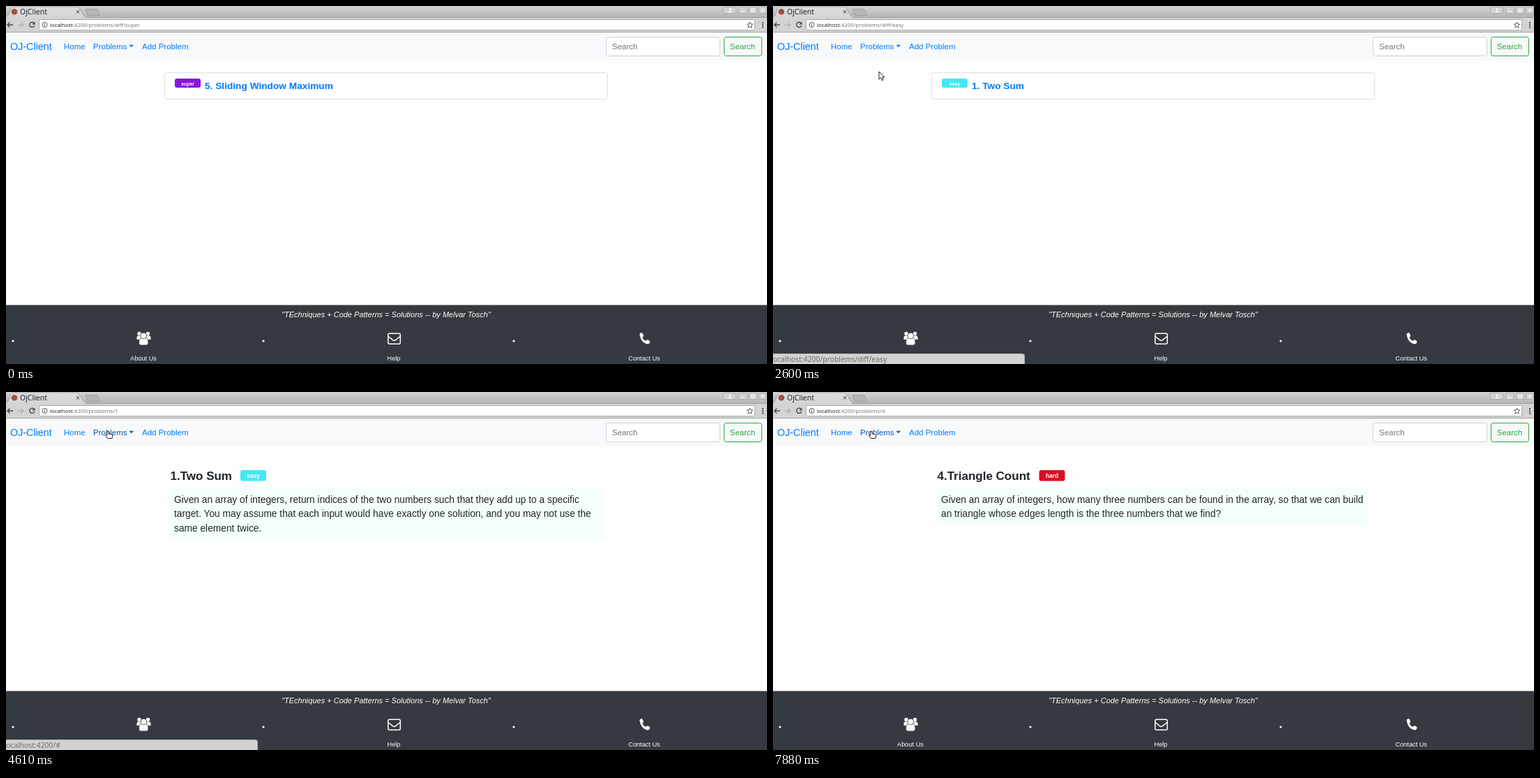
Recreate the animation shown at these times as an HTML page. Size 1091 by 513 pixels, loop 8000 ms.

```html
<!DOCTYPE html>
<html lang="en">
<head>
<meta charset="utf-8">
<title>OjClient</title>
<style>
html, body { margin: 0; width: 100%; height: 100%; overflow: hidden; background: #fefefe; }
svg { display: block; width: 1091px; height: 513px; font: 11.5px "Liberation Sans", Arial, sans-serif; fill: #212529; }
text { white-space: pre; }
.ui { font-family: "Noto Sans", "Open Sans", sans-serif; }
.link { fill: #007bff; }
.link.hover { fill: #0056b3; }
.bold { font-weight: bold; }
.mid { text-anchor: middle; }
.white { fill: #fff; }
.line { fill: none; stroke: #444; stroke-width: 1.3; }
.win { fill: #d2d2d2; stroke: #a8a8a8; stroke-width: .8; }
.cursor { fill: #fff; stroke: #222; stroke-width: 1; stroke-linejoin: round; }
</style>
</head>
<body>
<svg viewBox="0 0 1091 513">
  <defs>
    <linearGradient id="strip" x2="0" y2="1"><stop stop-color="#d2d2d2"/><stop offset="1" stop-color="#b2b2b2"/></linearGradient>
    <linearGradient id="bar" x2="0" y2="1"><stop stop-color="#dedede"/><stop offset="1" stop-color="#d3d3d3"/></linearGradient>
  </defs>

  <!-- browser frame -->
  <g class="ui">
    <path fill="url(#strip)" d="M0 0H1091V18H0z"/>
    <path fill="#d3d3d3" d="M0 17H1091V38H0z"/>
    <path stroke="#999" d="M0 16.5H1091M0 37.5H1091" stroke-width=".8"/>
    <path fill="url(#bar)" d="M0 18V16Q3 15 5 8T10 1H102Q105 1 107 6T115 17V18z"/>
    <path class="line" style="stroke:#999;stroke-width:.8" d="M0 16Q3 15 5 8T10 1H102Q105 1 107 6T115 17"/>
    <path fill="#b5b5b5" stroke="#999" stroke-width=".8" d="M114 4.5H130Q132 4.5 134.500 13.500H119Q117 13.500 114 4.500z"/>
    <circle cx="12" cy="8.300" r="4.300" fill="#a5513c"/>
    <text x="20" y="12" font-size="10.450">OjClient</text>
    <path class="line" style="stroke-width:1" d="M101 6l4 4.500m0-4.500l-4 4.500"/>
    <path class="win" d="M1028.500 1.500h18v9h-18zM1050.500 1.500h12v9h-12zM1065.500 1.500h11v9h-11zM1079.500 1.500h11v9h-11z"/>
    <path fill="none" stroke="#fff" d="M1036 8.500q2-3 4 0zM1054 8h5M1069 4h4v4h-4zM1083 4l4 4m0-4l-4 4"/>
    <circle cx="1038" cy="4.500" r="1.300" fill="#fff"/>
    <path class="line" d="M10 27H2M5.500 23.500L2 27l3.500 3.500"/>
    <path class="line" style="stroke:#b2b2b2" d="M17 27h8M21.500 23.500L25 27l-3.500 3.500"/>
    <path class="line" d="M40.500 25a3.600 3.600 0 1 0 .3 3"/>
    <path fill="#444" d="M41.500 22.500v4h-4z"/>
    <rect x="47.500" y="19.500" width="1026" height="15" rx="2" fill="#fff" stroke="#aaa"/>
    <circle class="line" style="stroke-width:.9" cx="55.500" cy="27" r="3.600"/>
    <path class="line" style="stroke-width:1" d="M55.500 26.500v2.700M55.500 24.700v1"/>
    <text x="63" y="29.700" font-size="7.760">localhost<tspan fill="#777">:4200/<tspan id="url"></tspan></tspan></text>
    <path class="line" style="stroke-width:.9" d="M1066.500 23l1.200 2.800 3 .3-2.300 2 .7 3-2.600-1.600-2.600 1.600.7-3-2.300-2 3-.3z"/>
    <path fill="#444" d="M1084 23h2v2h-2zm0 3.200h2v2h-2zm0 3.200h2v2h-2z"/>
  </g>

  <!-- navigation -->
  <path fill="#f8f9fa" d="M0 38H1091V78H0z"/>
  <text class="link" x="6" y="63" font-size="14.350">OJ-Client</text>
  <text class="link" x="83" y="62">Home</text>
  <g id="problems" class="link"><text x="125" y="62">Problems</text><path d="M176.500 55.800h6.600l-3.300 3.500z"/></g>
  <text class="link" x="195" y="62">Add Problem</text>
  <rect x="860.500" y="44.500" width="163" height="27" rx="3" fill="#fff" stroke="#ced4da"/>
  <text x="869" y="62" fill="#6c757d">Search</text>
  <rect x="1029.500" y="44.500" width="54" height="27" rx="3" fill="none" stroke="#28a745"/>
  <text class="mid" x="1056" y="62" fill="#28a745">Search</text>

  <!-- problem list -->
  <g id="list">
    <rect x="227.500" y="95.500" width="635" height="38" rx="3" fill="#fff" stroke="#dfdfdf"/>
    <rect class="badge" x="242" y="104" width="37" height="13" rx="3"/>
    <text class="level mid bold white" x="260.500" y="114" font-size="7"></text>
    <text id="title" class="link bold" x="285" y="119" font-size="13.700"></text>
  </g>

  <!-- problem detail -->
  <g id="detail">
    <text id="heading" class="bold" x="235.500" y="125.500" font-size="17"></text>
    <g id="tag">
      <rect class="badge" y="112" width="37" height="15.500" rx="3"/>
      <text class="level mid bold white" x="18.500" y="122.500" font-size="8.400"></text>
    </g>
    <rect id="panel" x="236" y="138" width="618" rx="3" fill="#f5fffa"/>
    <g id="body" font-size="13.760"></g>
  </g>

  <!-- dropdown -->
  <g id="menu">
    <rect x="120.500" y="74.500" width="113.500" height="138" rx="3" fill="#fff" stroke="#d6d6d6"/>
    <rect id="row" x="121" width="112.500" height="23" fill="#f8f9fa"/>
    <path stroke="#e9ecef" d="M121 178h112.500"/>
    <text x="137" y="95.700">Easy</text>
    <text x="137" y="118.700">Medium</text>
    <text x="137" y="141.700">Hard</text>
    <text x="137" y="164.700">Super</text>
    <text x="137" y="199.500">All Problems</text>
  </g>

  <!-- footer -->
  <path fill="#343a40" d="M0 428.500H1091V513H0z"/>
  <g class="white mid" font-size="9.200">
    <text x="545" y="445.500" font-size="11" font-style="italic">"TEchniques + Code Patterns = Solutions -- by Melvar Tosch"</text>
    <text x="197" y="508">About Us</text>
    <text x="556" y="508">Help</text>
    <text x="915" y="508">Contact Us</text>
    <circle cx="10" cy="480" r="1.600"/><circle cx="369" cy="480" r="1.600"/><circle cx="728" cy="480" r="1.600"/>
    <circle cx="191" cy="469.500" r="2.700"/><circle cx="203.500" cy="469.500" r="2.700"/>
    <path d="M187.500 478v-3q0-2.500 2-2.500h15.500q2.500 0 2.500 2.500v3z"/>
    <g stroke="#343a40" stroke-width=".8">
      <path d="M190.500 483q0-7.500 4-7.500h5.500q4 0 4 7.500 0 3-3 3h-7.500q-3 0-3-3z"/>
      <circle cx="197.300" cy="472.500" r="4.300"/>
    </g>
    <g fill="none" stroke="#fff" stroke-width="1.500">
      <rect x="547.800" y="469.300" width="17.500" height="15" rx="2"/>
      <path d="M548 473.500l6.500 5.200q2 1.600 4 0l6.500-5.200"/>
    </g>
    <path d="M908.300 470.500q0-1.700 3-2.500 1 0 2.700 4.200.3 1-1.800 2.700 1.700 3.500 5 5.200 1.800-2.200 2.700-1.900 4 1.800 3.300 3.100-.8 3.200-3.400 3.200-9.500-1.500-11.500-14z"/>
  </g>

  <!-- link preview -->
  <g id="status" class="ui">
    <path fill="#d2d2d2" stroke="#b5b5b5" d="M-1 498.500H357.500q3 0 3 3V514H-1z"/>
    <text id="preview" x="-2.700" y="510" font-size="10.350" fill="#6c6c6c"></text>
  </g>

  <g id="pointer" class="cursor">
    <path id="hand" d="M-1.200 6V.6q1.200-1.300 2.400 0V4l4.300.8q1.500.4 1.300 1.900L6 10.500H-.5L-3.500 6.600q.7-1.400 2.300-.2z"/>
    <path id="arrow" d="M0 0v11l2.600-2.300 1.800 4 1.800-.8-1.700-3.900h3.300z"/>
    <path id="beam" d="M-2-5H2M0-5V5M-2 5H2"/>
  </g>
</svg>
<script>
const $ = id => document.getElementById(id);
const LOOP = 8000;

const problems = {
  super: { no: 5, name: 'Sliding Window Maximum', color: '#8a14e0' },
  easy: { no: 1, name: 'Two Sum', color: '#41e8f4', tagX: 336, lines: [
    'Given an array of integers, return indices of the two numbers such that they add up to a specific',
    'target. You may assume that each input would have exactly one solution, and you may not use the',
    'same element twice.'] },
  hard: { no: 4, name: 'Triangle Count', color: '#dc0d20', tagX: 381.5, lines: [
    'Given an array of integers, how many three numbers can be found in the array, so that we can build',
    'an triangle whose edges length is the three numbers that we find?'] }
};

// [time, level, is detail page]
const pages = [[0, 'super', 0], [2530, 'easy', 0], [3680, 'easy', 1], [6110, 'hard', 0], [7140, 'hard', 1]];
// [time, open]
const menus = [[0, 0], [1460, 1], [2530, 0], [4930, 1], [6040, 0]];
// [time, path, shown]
const previews = [
  [0, '', 0], [1110, '#', 1], [2100, 'problems/diff/easy', 1], [2990, 'problems/diff/easy', 0],
  [3170, 'problems/1', 1], [4050, 'problems/1', 0], [4470, '#', 1], [5283, 'problems/diff/easy', 1],
  [5346, 'problems/diff/medium', 1], [5720, 'problems/diff/hard', 1], [6460, 'problems/diff/hard', 0],
  [6960, 'problems/4', 1], [7510, 'problems/4', 0]];
// [start, end, steps, x, y]
const moves = [
  [240, 1040, 13, 149, 59], [1110, 1460, 5, 152, 61], [1920, 2220, 6, 152, 94], [2930, 3290, 7, 323, 114],
  [3990, 4610, 10, 146, 56], [5220, 5410, 4, 155, 110], [5590, 5850, 5, 157, 138],
  [6400, 6770, 7, 338, 113], [7450, 7880, 8, 141, 56]];

const lastIndex = (list, t) => list.findLastIndex(entry => entry[0] <= t);
const show = (id, on) => $(id).style.display = on ? '' : 'none';
const smooth = p => p * p * (3 - 2 * p);

function pointerAt(t) {
  let x = 940, y = 492;
  for (const [start, end, steps, toX, toY] of moves) {
    if (t < start) break;
    const step = Math.floor((t - start) / (end - start) * (steps - 1) + 1e-6) + 1;
    const p = smooth(Math.min(1, step / steps));
    x += (toX - x) * p;
    y += (toY - y) * p;
  }
  return [x, y];
}

let shownPage = -1;
function setPage(index) {
  if (index === shownPage) return;
  shownPage = index;
  const [, level, detail] = pages[index];
  const { no, name, color, tagX, lines = [] } = problems[level];
  show('list', !detail);
  show('detail', detail);
  $('url').textContent = 'problems/' + (detail ? no : 'diff/' + level);
  $('title').textContent = `${no}. ${name}`;
  $('heading').textContent = `${no}.${name}`;
  document.querySelectorAll('.badge').forEach(el => el.setAttribute('fill', color));
  document.querySelectorAll('.level').forEach(el => el.textContent = level);
  $('tag').setAttribute('transform', `translate(${tagX || 0})`);
  $('panel').setAttribute('height', 11 + 20.7 * lines.length);
  $('body').innerHTML = lines.map((s, i) => `<text x="241" y="${158.5 + 20.6 * i}">${s}</text>`).join('');
}

function setPreview(t) {
  const i = lastIndex(previews, t);
  const [start, path, shown] = previews[i];
  const fading = i > 0 && shown !== previews[i - 1][2] && t - start < 70;
  $('status').setAttribute('opacity', fading ? .4 : shown);
  $('preview').textContent = 'localhost:4200/' + path;
}

function draw(t) {
  const page = lastIndex(pages, t);
  const detail = pages[page][2];
  const open = menus[lastIndex(menus, t)][1];
  const [x, y] = pointerAt(t);
  setPage(page);
  setPreview(t);

  const onNav = t >= 240 && x > 120 && x < 189 && y > 45 && y < 73;
  const row = open && x > 120 && x < 234 && y >= 80 && y < 172 ? Math.floor((y - 80) / 23) : -1;
  const onTitle = !detail && page > 0 && x >= 285 && y > 104 && y < 125;
  $('problems').classList.toggle('hover', onNav);
  $('title').classList.toggle('hover', onTitle);
  show('menu', open);
  show('row', row >= 0);
  $('row').setAttribute('y', 80 + 23 * row);

  const onLink = onNav || row >= 0 || onTitle;
  const onText = !onLink && detail && x >= 236 && y > 110;
  show('pointer', t >= 240);
  show('hand', onLink);
  show('beam', onText);
  show('arrow', !onLink && !onText);
  $('pointer').setAttribute('transform', `translate(${x.toFixed(1)} ${y.toFixed(1)})`);
}

function tick() {
  draw(performance.now() % LOOP);
  requestAnimationFrame(tick);
}
tick();
</script>
</body>
</html>
```
